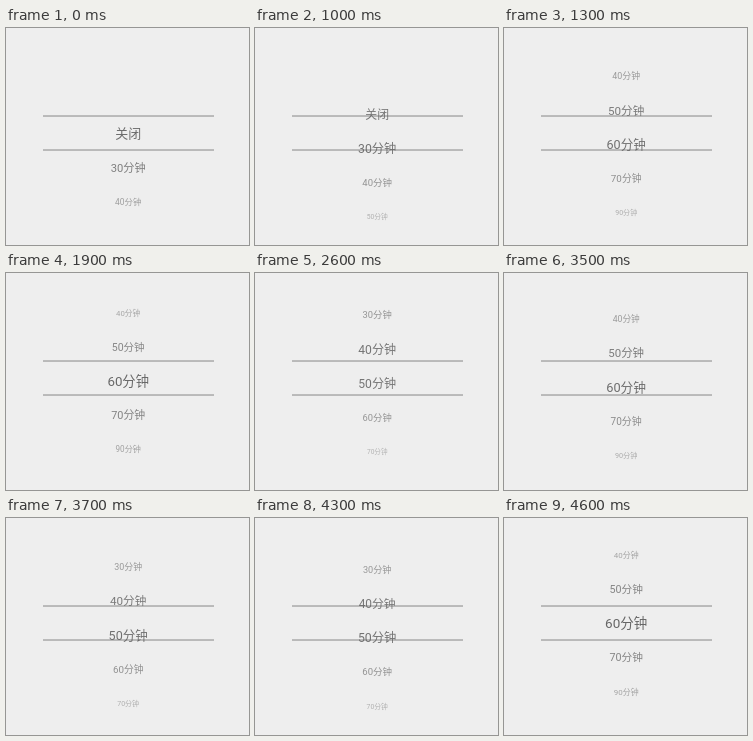
Animation of 243x217 px, one loop 7000 ms. Source, as an HTML page:

```html
<!DOCTYPE html>
<html lang="zh-CN">
<head>
<meta charset="utf-8">
<title>定时选择</title>
<style>
html, body { margin: 0; width: 100%; height: 100%; overflow: hidden; background: #eee; }
svg { display: block; width: 100%; height: 100%; }
text {
  font-family: Roboto, "Noto Sans CJK SC", "Noto Sans CJK", sans-serif;
  text-anchor: middle;
  fill: #666;
}
path { stroke: #868686; stroke-width: 1; }
</style>
</head>
<body>
<svg viewBox="0 0 243 217">
  <path d="M37 88H208M37 122H208"/>
  <g id="wheel"></g>
</svg>
<script>
const LOOP = 7000, STEP = 100, MID_X = 122.2, MID_Y = 105.3, GAP = 34.2;
const labels = ['关闭', ...[30, 40, 50, 60, 70, 90].map(n => n + '分钟')];

// Each swipe turns the wheel between two rows in a few even time steps.
// power: strength of the slowdown; lag: how far the magnified centre trails, in px
const swipes = [
  { at: 0, steps: 1, from: 0, to: 0, power: 1, lag: 6 },
  { at: 1000, steps: 5, from: 0.56, to: 4, power: 1.7, lag: 0 },
  { at: 1900, steps: 4, from: 3.92, to: 2, power: 1, lag: 5 },
  { at: 2600, steps: 3, from: 2.85, to: 6, power: 1.4, lag: -12 },
  { at: 3200, steps: 8, from: 5.8, to: 2, power: 1.4, lag: 0 },
  { at: 4300, steps: 4, from: 2.58, to: 4, power: 2, lag: 0 }
];

const wheel = document.getElementById('wheel');
const rows = labels.map(label => {
  const el = document.createElementNS('http://www.w3.org/2000/svg', 'text');
  el.textContent = label;
  el.setAttribute('x', MID_X);
  wheel.append(el);
  return el;
});

function wheelAt(time) {
  const { at, steps, from, to, power, lag } = swipes.findLast(s => s.at <= time);
  const last = steps - 1;
  const step = Math.min(last, Math.floor((time - at) / STEP));
  const left = last ? (1 - step / last) ** power : 1;
  return { pos: to + (from - to) * left, shift: lag * left };
}

function draw(time) {
  const { pos, shift } = wheelAt(time);
  rows.forEach((el, i) => {
    const y = MID_Y + (i - pos) * GAP;
    const dist = Math.abs(y - MID_Y - shift);
    const size = Math.max(1, 13.5 - 0.081 * dist);
    el.setAttribute('y', y + 0.37 * size);
    el.setAttribute('font-size', size);
    el.setAttribute('opacity', Math.max(0, 1 - 0.0066 * dist));
    el.setAttribute('visibility', Math.abs(i - pos) < 2.5 ? 'visible' : 'hidden');
  });
}

const start = performance.now();
function tick() {
  draw((performance.now() - start) % LOOP);
  requestAnimationFrame(tick);
}
tick();
</script>
</body>
</html>
```
